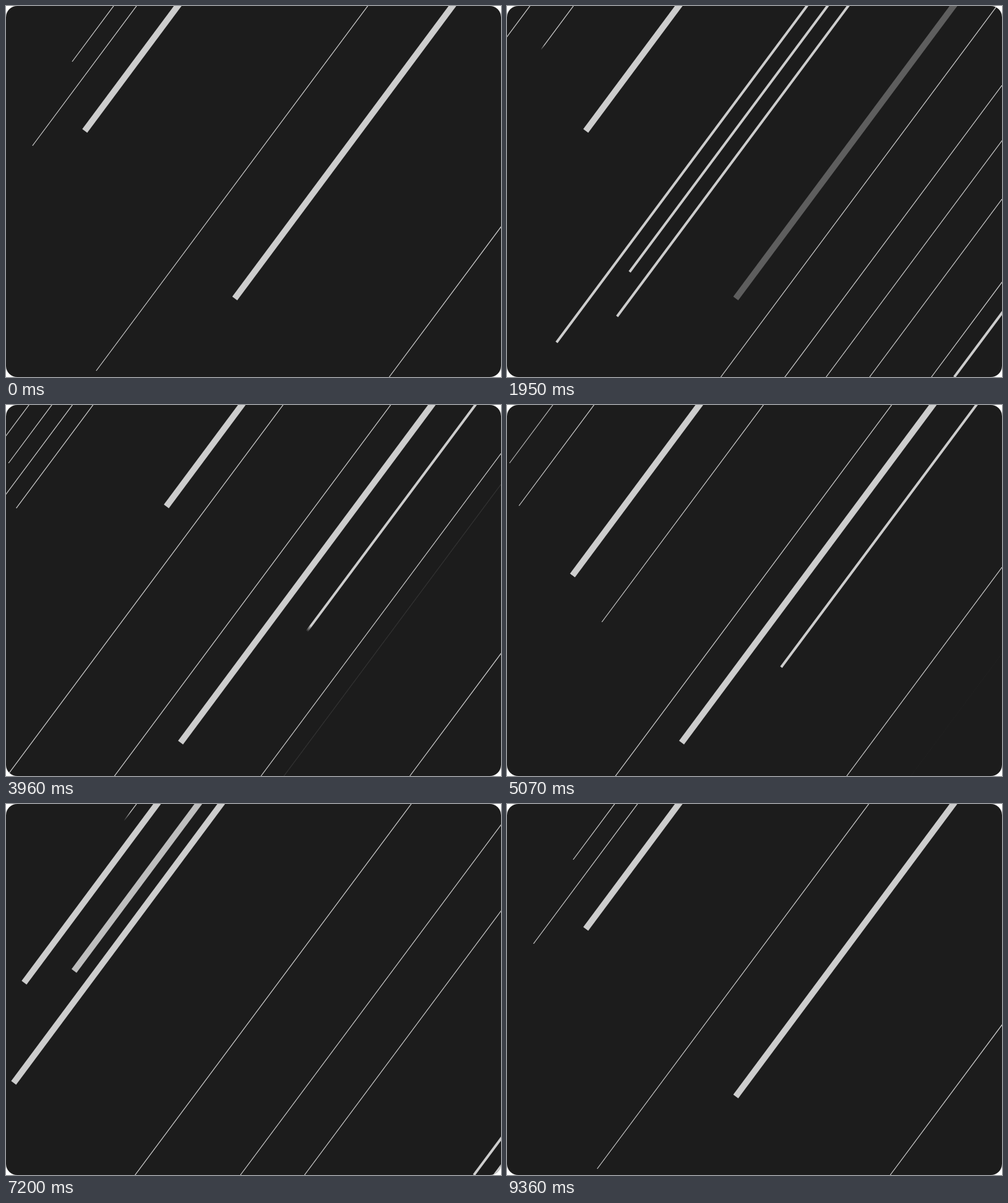
Recreate the animation shown at these times as an HTML page with a canvas. Size 800 by 600 pixels, loop 9.57 s.

```html
<!DOCTYPE html>
<html lang="en">
<head>
<meta charset="utf-8">
<title>Diagonal lines</title>
<style>
  html, body { margin: 0; width: 100%; height: 100%; overflow: hidden; background: #fff; }
  canvas { display: block; width: 800px; height: 600px; background: #1c1c1c; border-radius: 18px; }
</style>
</head>
<body>
<canvas id="stage" width="800" height="600"></canvas>
<script>
const ctx = document.getElementById('stage').getContext('2d');
const LOOP = 9570, STEP = 30;
const GROW = 450, FADE = 260, SHUTTER = 8;
const SLOPE = 0.7438;     // leftward shift per pixel of height
const COLOR = '#cdcdcd';

// Lines stand in even slots. Each wave grows and fades its slots in the listed
// order, at even intervals between the first and last start time.
const waves = [
  { grow: [345, 1890], fade: [1990, 4170], slots: [13, 14, 15, 33, 22, 27, 29, 32, 25, 0, 2] },
  { grow: [2655, 3795], fade: [4155, 5915], slots: [12, 10, 24, 31, 1, 19, 17, 3, 21] },
  { grow: [4130, 5414], fade: [6500, 7860], slots: [11, 28, 8, 23, 26] },
  { grow: [6180, 6540], fade: [8500, 9100], slots: [18, 6, 34, 35, 9] },
  { grow: [7185, 8905], fade: [340, 2150], slots: [5, 4, 30, 16, 20, 7] }
];

// Heights of the tips from the left; all further lines reach the bottom edge
const tips = [60, 94, 165, 163, 90, 226, 289, 202, 270, 451, 164, 351,
  640, 544, 430, 502, 590, 640, 640, 546, 473, 424];
const tipOf = slot => tips[slot] ?? 600;

// Every group of four slots is followed by a slightly wider gap
const topOf = slot => 37 + 33.3 * slot + 3.7 * Math.ceil(slot / 4);

const between = (v, low, high) => v >= low && v <= high;

function widthOf(slot) {
  if (between(slot, 6, 10) || between(slot, 19, 20)) return 10;
  if (between(slot, 13, 15) || slot === 21 || slot > 32) return 4;
  return 1.25;
}

const wrap = t => (t % LOOP + LOOP) % LOOP;
const clamp = v => Math.min(1, Math.max(0, v));
const mix = ([a, b], p) => a + (b - a) * p;

// Ease out with a slight overshoot
function backOut(p) {
  const u = clamp(p) - 1;
  return 1 + 1.8 * u ** 3 + 0.8 * u ** 2;
}

function drawLine(slot, age, life) {
  const alpha = 1 - clamp((age - life) / FADE);
  if (!alpha || !age) return;
  const top = topOf(slot);
  const start = Math.max(0, (top - 800) / SLOPE);
  const xAt = y => top - SLOPE * y;
  const tipAt = ms => mix([start, tipOf(slot)], backOut(ms / GROW));
  const [near, far] = [tipAt(age - SHUTTER), tipAt(age)].sort((a, b) => a - b);

  ctx.globalAlpha = alpha;
  ctx.lineWidth = widthOf(slot);
  ctx.strokeStyle = COLOR;
  if (far - near > 0.3) {   // motion blur at the moving tip
    const blur = ctx.createLinearGradient(xAt(near), near, xAt(far), far);
    blur.addColorStop(0, COLOR);
    blur.addColorStop(1, COLOR + '00');
    ctx.strokeStyle = blur;
  }
  ctx.beginPath();
  ctx.moveTo(xAt(start - 20), start - 20);
  ctx.lineTo(xAt(far), far);
  ctx.stroke();
}

function draw(t) {
  ctx.clearRect(0, 0, 800, 600);
  for (const { grow, fade, slots } of waves) {
    slots.forEach((slot, i) => {
      const p = i / (slots.length - 1);
      const born = mix(grow, p);
      drawLine(slot, wrap(t - born), wrap(mix(fade, p) - born));
    });
  }
}

const origin = performance.now();
function tick() {
  const t = wrap(performance.now() - origin);
  draw(Math.floor(t / STEP) * STEP);
  requestAnimationFrame(tick);
}
tick();
</script>
</body>
</html>
```
